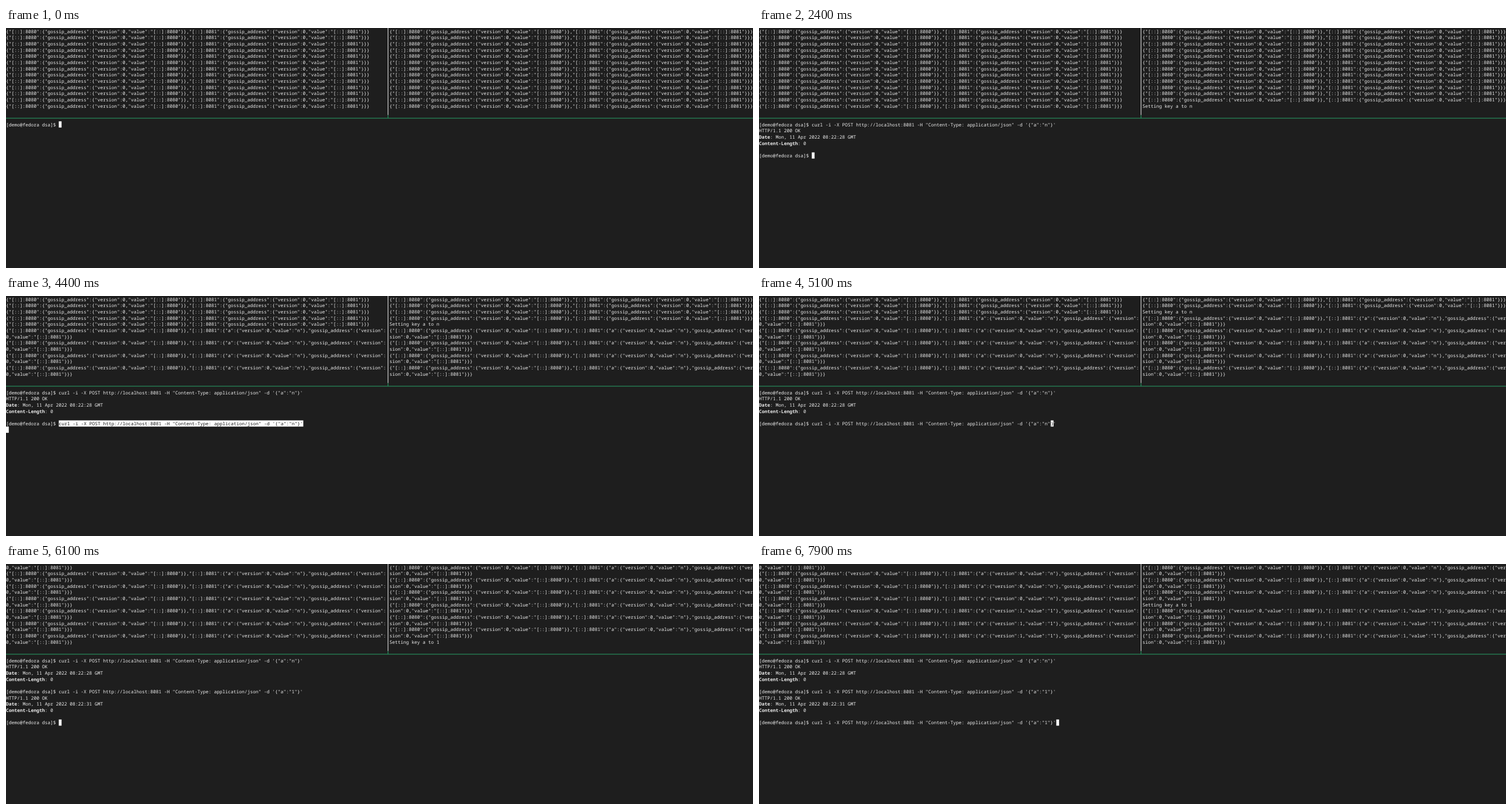
Recreate the animation shown at these times as an HTML page. Size 1280x412 px, loop 8000 ms.

```html
<!DOCTYPE html>
<html lang="en">
<head>
<meta charset="utf-8">
<title>Gossip terminal</title>
<style>
html, body { margin: 0; width: 100%; height: 100%; overflow: hidden; background: #1e1e1e; }
svg { display: block; background: #1e1e1e; }
text {
  fill: #ececec; white-space: pre;
  font-family: "Noto Sans Mono", "DejaVu Sans Mono", monospace;
  text-rendering: geometricPrecision; font-kerning: none; font-variant-ligatures: none;
}
.bold { font-weight: bold; }
.dark { fill: #1e1e1e; }
</style>
</head>
<body>
<svg id="stage" width="1280" height="412" viewBox="0 0 1280 412"></svg>
<script>
const LOOP = 8000, COL = 4.761, ROW = 32 / 3, TOP = 0.2, BASELINE = 8.5;
const PANE_ROWS = 13, LEFT_COLS = 137, RIGHT_COLS = 131, RIGHT_START = 138;
const PROMPT = '[demo@fedora dsa]$ ';

const stage = document.getElementById('stage');
stage.style.fontSize = COL / 0.6 + 'px';

const command = value =>
  `curl -i -X POST http://localhost:8081 -H "Content-Type: application/json" -d '{"a":"${value}"}'`;
const address = port => `"gossip_address":{"version":0,"value":"[::]:${port}"}`;
const state = (key = '') => `{"[::]:8080":{${address(8080)}},"[::]:8081":{${key}${address(8081)}}}`;
const keyed = (version, value) => state(`"a":{"version":${version},"value":"${value}"},`);

// Messages printed in the upper panes; notes appear on the right only.
const say = (times, text, note = false) => times.map(at => ({ at, text, note }));
const log = [
  ...say(Array(PANE_ROWS).fill(0), state()),
  ...say([2400], 'Setting key a to n', true),
  ...say([3000, 3400, 4100, 4400, 5100, 5400, 6100], keyed(0, 'n')),
  ...say([6100], 'Setting key a to 1', true),
  ...say([6400, 7100, 7400], keyed(1, '1'))
];

// Time, row, column; a time alone hides the cursor.
const cursorSteps = [
  [0, 15, 19], [100], [700, 15, 19], [1100, 16, 0], [1400], [2000, 16, 0],
  [2400, 20, 19], [3000], [3600, 20, 19], [4400, 21, 0], [4800, 20, 107],
  [4900, 20, 106], [5100, 20, 105], [5200, 20, 104], [6000, 21, 0],
  [6100, 25, 19], [6700], [7300, 25, 19], [7900, 25, 107]
];

const rowTop = row => TOP + row * ROW;

function rect(x, y, w, h, fill) {
  return `<rect x="${x}" y="${y}" width="${w}" height="${h}" fill="${fill}"/>`;
}

// Text between asterisks is bold.
function put(row, col, text, dark = false) {
  const marked = text.replace(/\*(.+?)\*/g, '<tspan class="bold">$1</tspan>');
  return `<text x="${col * COL}" y="${rowTop(row) + BASELINE}"${dark ? ' class="dark"' : ''}>${marked}</text>`;
}

function inverse(row, col, text) {
  return rect(col * COL, rowTop(row), text.length * COL, ROW, '#fff') + put(row, col, text, true);
}

function pane(t, col, width, notes) {
  const rows = [];
  for (const { at, text, note } of log) {
    if (at > t || (note && !notes)) continue;
    for (let i = 0; i < text.length; i += width) rows.push(text.slice(i, i + width));
  }
  return rows.slice(-PANE_ROWS).map((text, i) => put(i, col, text)).join('');
}

function shell(t) {
  const lines = {};
  const reply = (row, second) => {
    lines[row] = 'HTTP/1.1 200 OK';
    lines[row + 1] = `*Date*: Mon, 11 Apr 2022 08:22:${second} GMT`;
    lines[row + 2] = '*Content-Length*: 0';
  };
  lines[15] = PROMPT + (t >= 1100 ? command('n') : '');
  if (t >= 2400) {
    reply(16, 28);
    lines[20] = PROMPT + (t >= 4400 ? command(t < 5800 ? 'n' : '1') : '');
  }
  if (t >= 6100) {
    reply(21, 31);
    lines[25] = PROMPT + (t >= 7900 ? command('1') : '');
  }
  let html = Object.entries(lines).map(([row, text]) => put(+row, 0, text)).join('');

  // Freshly pasted text stays highlighted until the next key.
  if (t >= 1100 && t < 2300) html += inverse(15, PROMPT.length, command('n'));
  if (t >= 4400 && t < 4800) html += inverse(20, PROMPT.length, command('n'));

  const [, row, col] = cursorSteps.filter(step => step[0] <= t).pop();
  if (row !== undefined) html += inverse(row, col, (lines[row] || '')[col] || ' ');
  return html;
}

const wallX = (LEFT_COLS + 0.5) * COL - 0.5, floorY = rowTop(14.5) - 0.5;
const borders =
  rect(wallX, 0, 1, rowTop(14), '#ececec') +
  rect(wallX, rowTop(14), 1, ROW / 2, '#26a269') +
  rect(0, floorY, 1280, 1, '#26a269');

let shown = -1;
function frame() {
  const t = Math.floor(performance.now() % LOOP / 100) * 100;
  if (t !== shown) {
    shown = t;
    stage.innerHTML = pane(t, 0, LEFT_COLS, false) +
      pane(t, RIGHT_START, RIGHT_COLS, true) + borders + shell(t);
  }
  requestAnimationFrame(frame);
}
frame();
</script>
</body>
</html>
```
